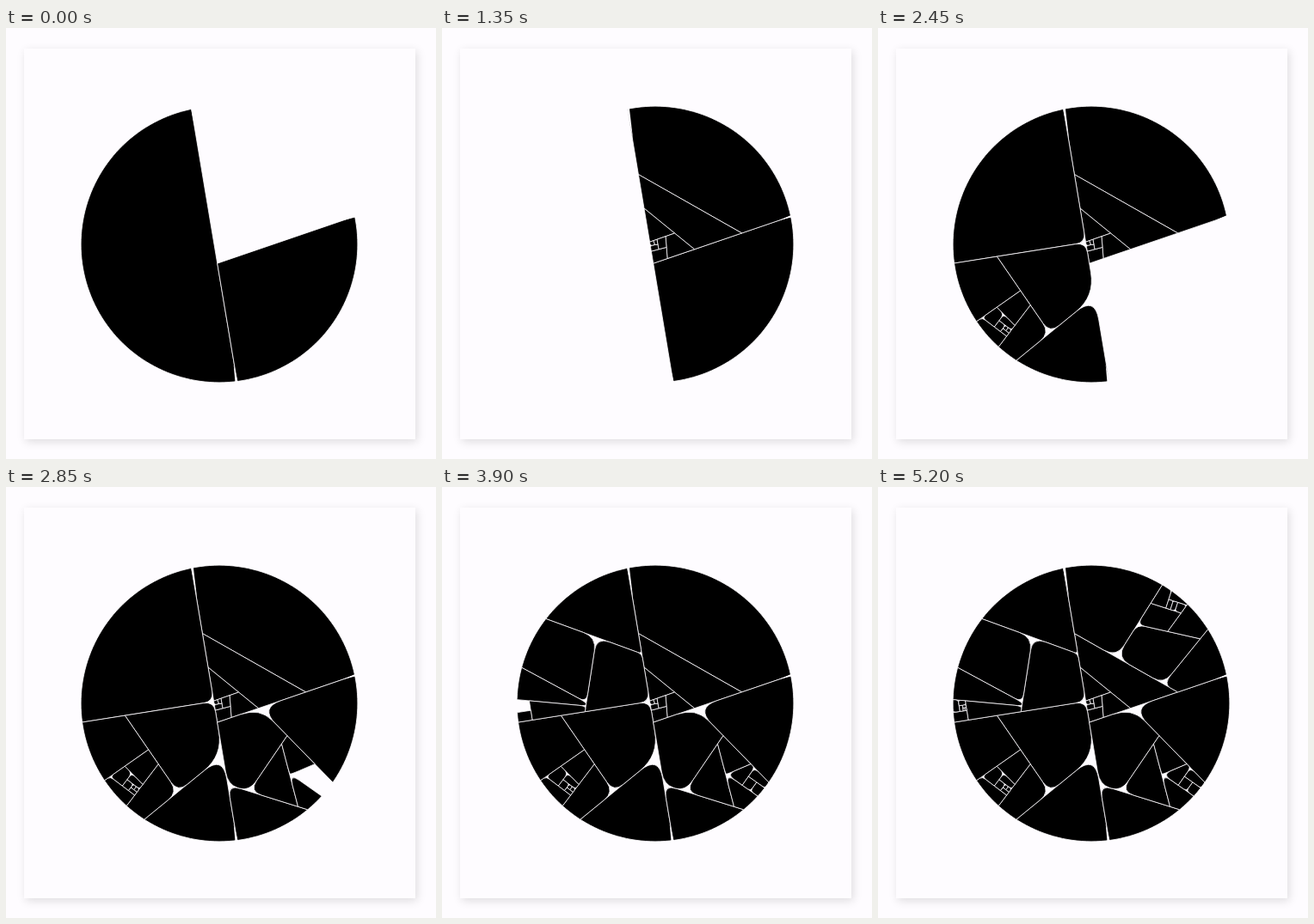
These frames come from a looping animation (500x502 px, 5500 ms). An HTML page:

```html
<!DOCTYPE html>
<html lang="en">
<head>
<meta charset="utf-8">
<title>Shattering disc</title>
<style>
  html, body { margin: 0; width: 100%; height: 100%; overflow: hidden; background: #fefcff; }
  .card {
    position: absolute; left: 20.5px; top: 24px; width: 455px; height: 455px;
    box-shadow: 2px 3px 10px rgba(0, 0, 0, .13);
  }
  svg { position: absolute; left: 0; top: 0; display: block; }
  path { stroke: #fefcff; stroke-width: .8; stroke-linejoin: bevel; }
  .seams { fill: #fefcff; stroke: none; }
</style>
</head>
<body>
<div class="card"></div>
<svg width="500" height="502" viewBox="0 0 500 502">
  <g id="shards"></g>
  <path class="seams" d="M214 88h3.2l5 42z M266.6 414h3.4l-5.3-22z M410 216.2v3.4l-18 4.3z"/>
</svg>
<script>
const LOOP = 5500, STEP = 50;
const CX = 248, CY = 252, RADIUS = 160.9, SIDES = 180;
const layer = document.getElementById('shards');
const shown = [];

// Splits a convex polygon by the line at `dist` from the centre whose normal
// points at `deg`; `blunt` rounds the corners at one end, its sign picks which.
function cut(poly, [deg, dist, blunt = 0]) {
  const a = deg * Math.PI / 180, nx = Math.cos(a), ny = Math.sin(a);
  const side = p => nx * (p.x - CX) + ny * (p.y - CY) - dist;
  const along = p => nx * p.y - ny * p.x;
  const shard = [], rest = [], ends = [];
  poly.forEach((p, i) => {
    const q = poly[(i + 1) % poly.length], sp = side(p), sq = side(q);
    (sp > 0 ? shard : rest).push(p);
    if (sp > 0 === sq > 0) return;
    const k = sp / (sp - sq);
    const end = { x: p.x + (q.x - p.x) * k, y: p.y + (q.y - p.y) * k, r: 0 };
    shard.push(end);
    rest.push(end);
    ends.push(end);
  });
  ends.sort((p, q) => along(p) - along(q));
  if (blunt && ends.length) ends[blunt > 0 ? ends.length - 1 : 0].r = Math.abs(blunt);
  return [shard, rest];
}

// A cut square across the middle of the longest edge.
function halving(poly) {
  let best = { length: 0 };
  poly.forEach((p, i) => {
    const q = poly[(i + 1) % poly.length], dx = q.x - p.x, dy = q.y - p.y;
    const length = Math.hypot(dx, dy);
    if (length > best.length) best = { length, dx, dy, x: (p.x + q.x) / 2, y: (p.y + q.y) / 2 };
  });
  const { length, dx, dy, x, y } = best;
  return [Math.atan2(dy, dx) * 180 / Math.PI, ((x - CX) * dx + (y - CY) * dy) / length, length / 6];
}

// Large cuts first, then what is left crumbles into `crumbs` small shards.
function shatter(poly, cuts, crumbs) {
  const shards = [];
  const split = line => {
    const [shard, rest] = cut(poly, line);
    shards.push(shard);
    poly = rest;
  };
  cuts.forEach(split);
  for (let i = 1; i < crumbs; i++) split(halving(poly));
  return [...shards, poly];
}

function outline(poly) {
  const toward = (p, q) => {
    const k = Math.min(.45, p.r / Math.hypot(q.x - p.x, q.y - p.y));
    return `${p.x + (q.x - p.x) * k} ${p.y + (q.y - p.y) * k}`;
  };
  const corners = poly.map((p, i) => {
    if (!p.r) return `${p.x} ${p.y}`;
    const prev = poly.at(i - 1), next = poly[(i + 1) % poly.length];
    return `${toward(p, prev)}Q${p.x} ${p.y} ${toward(p, next)}`;
  });
  return `M${corners.join('L')}Z`;
}

function show(poly, from, to = LOOP) {
  const el = document.createElementNS('http://www.w3.org/2000/svg', 'path');
  el.setAttribute('d', outline(poly));
  layer.append(el);
  shown.push({ el, from, to });
}

// One shard per step; the smallest one closes the series at `end`.
function showSeries(shards, start, end) {
  shards.forEach((shard, i) => show(shard, i === shards.length - 1 ? end : start + i * STEP));
}

const disc = Array.from({ length: SIDES }, (_, i) => {
  const a = i / SIDES * 2 * Math.PI;
  return { x: CX + RADIUS * Math.cos(a), y: CY + RADIUS * Math.sin(a), r: 0 };
});
const [leftHalf, rightHalf] = cut(disc, [170.5, 5.9]);
const [lowerRight, wedge] = cut(rightHalf, [71.1, 20.2]);

const [upperRight, ...wedgeShards] = shatter(wedge, [
  [-60.4, 61.1], [-50.8, 24.3], [-109.3, 4.8], [-4.5, 12.7], [75.3, 6.6], [-9.9, 2.9]
], 3);
const [upperLeft, ...leftShards] = shatter(leftHalf, [
  [-99, 3.2, 12], [50.7, 49.4, -28], [-34.5, -98.4, 14], [-125.1, 3.2], [37.2, -13.7], [-44.4, -129.7]
], 7);
const lowerRightShards = shatter(lowerRight, [
  [-44.3, 30.2, -26], [107.4, 87.4, 15], [-145.8, -86.5, -15],
  [165.4, -58.3], [125.2, 19.6, 14], [-113.2, -108.7, -10]
], 4);
const upperLeftShards = shatter(upperLeft, [
  [-69.9, 48.8, 5], [8.8, -79.3, -16], [-61.6, -37.2, 10], [-84.7, -10.5, 8], [-8.9, -144.3]
], 7);
const upperRightShards = shatter(upperRight, [
  [-147.8, 3.6, -17], [39, 51.1, 14], [102.7, -101.2, 9], [36, 22.6], [107.9, -132.2]
], 5);

show(leftHalf, 0, 1350);
show(lowerRight, 0, 2450);
show(upperRight, 300, 4550);
showSeries(wedgeShards, 500, 900);
show(upperLeft, 1500, 3500);
showSeries(leftShards, 1500, 2050);
showSeries(lowerRightShards, 2600, 3150);
showSeries(upperLeftShards, 3650, 4200);
showSeries(upperRightShards, 4700, 5200);

function draw() {
  const t = performance.now() % LOOP;
  for (const { el, from, to } of shown)
    el.style.visibility = t >= from && t < to ? 'visible' : 'hidden';
  requestAnimationFrame(draw);
}
draw();
</script>
</body>
</html>
```
